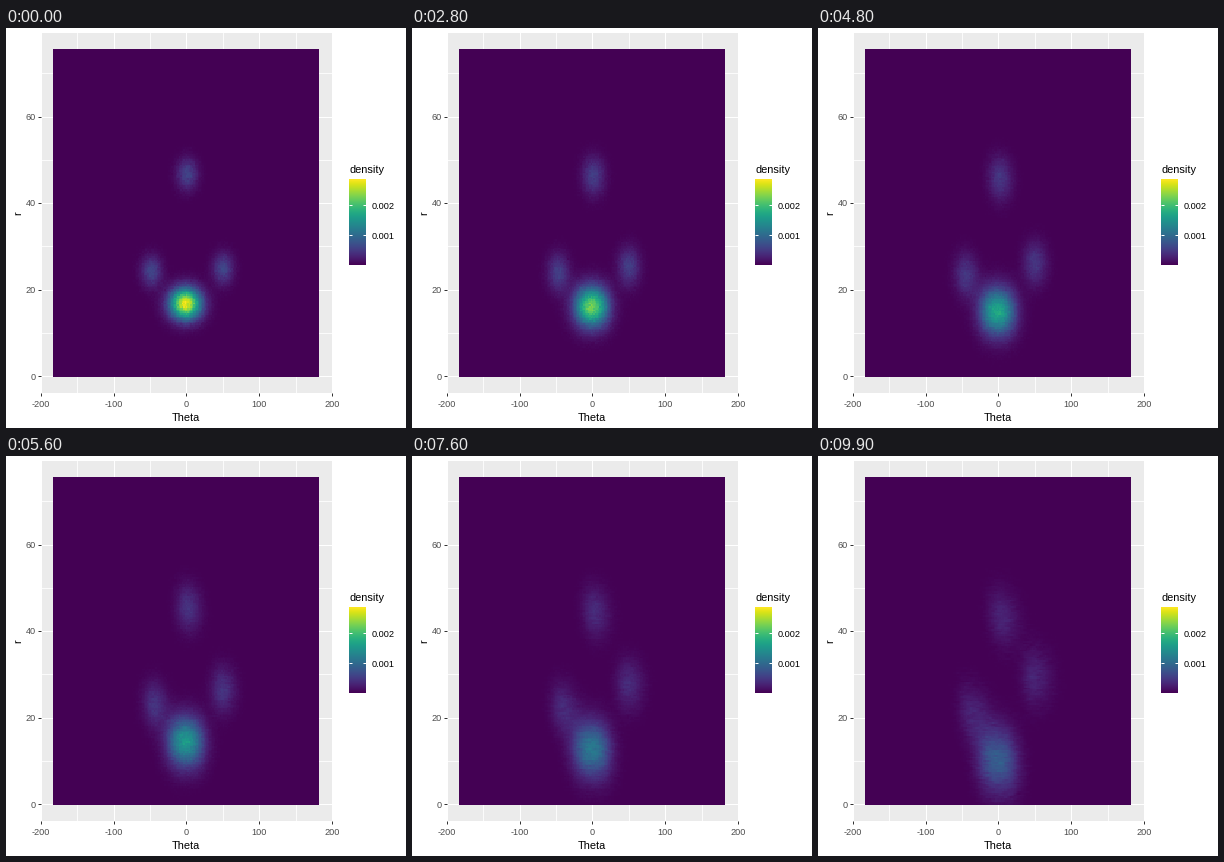
A matplotlib script that plays this animation: 400x400 px, repeating every 10000 ms.

```python
import numpy as np
import matplotlib.pyplot as plt
from matplotlib.animation import FuncAnimation

plt.rcParams["font.family"] = "Liberation Sans"
SIZE, FRAMES, VMAX = 400, 100, 0.00287

# Panel edges in pixels, and pixels per data unit
LEFT, TOP, RIGHT, BOTTOM = 34.5, 5, 326, 364.5
PX, PY, CX, CY = 0.729, 4.325, 180.5, 348
XLIM = (LEFT - CX) / PX, (RIGHT - CX) / PX
YLIM = (CY - BOTTOM) / PY, (CY - TOP) / PY

T0, T1, R0, R1 = -182.9, 181.7, -0.2, 75.5
NX, NY = 182, 190
theta = T0 + (T1 - T0) * (np.arange(NX) + 0.5)[None, :] / NX
radius = R0 + (R1 - R0) * (np.arange(NY) + 0.5)[:, None] / NY


def blob(x, y, w_left, w_right, h, peak, lean=0, power=2):
    """Peak with its own width on each side, leaning with radius."""
    dy = radius - y
    dx = theta - x - lean * dy
    w = np.where(dx < 0, w_left, w_right)
    return peak * np.exp(-0.5 * (np.abs(dx / w) ** power + (dy / h) ** 2))


def core(s, u):
    return blob(-1, 16.7 - 6.5 * u, 15 + 5 * s, 14.5 + 5.5 * s, 2.5 + 2.5 * s,
                0.00283 / (1 + 2.37 * u), lean=-0.4 * u, power=2 + 0.5 * s)


def satellite(s, u, x, y, dx, dy, lean):
    return blob(x + dx * u, y + dy * u, 9.5 + 1.5 * s, 9.5 + 7 * u,
                2.4 + 2 * s, 0.0006 / (1 + 1.2 * u), lean=lean * u)


def density(i):
    s = i / (FRAMES - 1)
    u = s ** 1.8
    d = (core(s, u)
         + satellite(s, u, 1, 46.6, 2, -3.6, -0.6)
         + satellite(s, u, -48, 24.2, 11, -3.4, -0.6)
         + satellite(s, u, 50, 24.8, -2, 4.5, -0.2))
    # Sampling noise, smearing along theta as the cloud spreads
    rng = np.random.default_rng(i + 1)
    noise = rng.normal(size=(NY, NX))
    smear = sum(np.roll(noise, k, 1) for k in range(4)) / 2
    noise += u * (smear - noise)
    return np.clip(d + 0.0016 * np.sqrt(d) * noise, 0, VMAX)


fig = plt.figure(figsize=(4, 4), dpi=100, facecolor="white")


def px_axes(x0, y0, x1, y1):
    return fig.add_axes([x0 / SIZE, 1 - y1 / SIZE,
                         (x1 - x0) / SIZE, (y1 - y0) / SIZE])


def label(x, y, s, size=9.2, color="black", **kw):
    kw = {"ha": "center", "va": "center_baseline", **kw}
    return fig.text(x / SIZE, 1 - y / SIZE, s, fontsize=size * 0.72,
                    color=color, **kw)


panel = px_axes(LEFT, TOP, RIGHT, BOTTOM)
panel.set_facecolor("#EBEBEB")
panel.spines[:].set_visible(False)
heat = panel.imshow(density(0), extent=(T0, T1, R0, R1), origin="lower",
                    aspect="auto", cmap="viridis", vmin=0, vmax=VMAX,
                    interpolation="nearest", zorder=2)
panel.set(xlim=XLIM, ylim=YLIM)
panel.set_xticks(range(-200, 201, 100), [""] * 5)
panel.set_yticks(range(0, 61, 20), [""] * 4)
panel.tick_params(length=2, width=0.72, color="#333333")

for v in range(-200, 201, 50):
    major = v % 100 == 0
    panel.axvline(v, color="white", lw=0.77 if major else 0.6, zorder=0)
    if major:
        label(CX - 0.3 + PX * v, 375.8, str(v), color="#4D4D4D")
for v in range(0, 71, 10):
    major = v % 20 == 0
    panel.axhline(v, color="white", lw=0.77 if major else 0.6, zorder=0)
    if major:
        label(29.5, CY - PY * v, str(v), color="#4D4D4D", ha="right")
label(179.5, 389, "Theta", 11)
label(12, 185, "r", 11, rotation=90, va="center")

bar = px_axes(343, 151, 360, 237)
bar.imshow(np.linspace(0, 1, 256)[:, None], origin="lower", aspect="auto",
           cmap="viridis", extent=(0, 1, 0, VMAX))
bar.axis("off")
label(343, 141, "density", 11, ha="left")
for v in (0.001, 0.002):
    y = 236.5 - 86 * v / VMAX
    bar.hlines([(237 - y) / 86 * VMAX] * 2, [0, 0.8], [0.2, 1],
               color="white", lw=0.72)
    label(365.5, y + 0.5, f"{v:.3f}", ha="left")


def update(i):
    heat.set_data(density(i))
    return heat,


anim = FuncAnimation(fig, update, frames=FRAMES, interval=100,
                     repeat=True, repeat_delay=0, blit=False)
plt.show()
```
